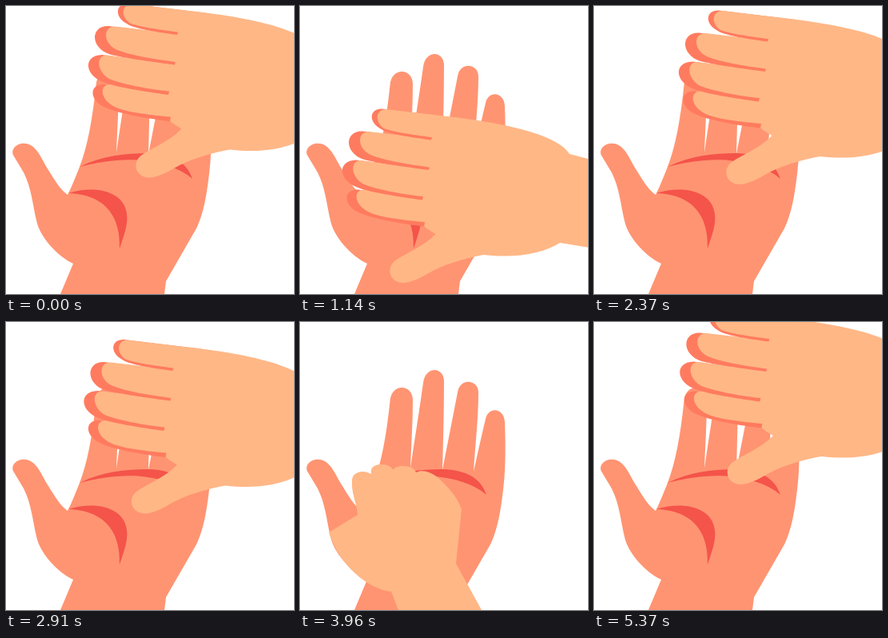
These frames come from a looping animation (360x360 px, 5.4 s). An HTML page with a canvas:

```html
<!DOCTYPE html>
<html>
<head>
<meta charset="utf-8">
<title>Hand washing</title>
<style>
html, body { margin: 0; width: 100%; height: 100%; overflow: hidden; background: #fff; }
canvas { display: block; width: 100vmin; height: 100vmin; }
</style>
</head>
<body>
<canvas id="stage"></canvas>
<script>
const SIZE = 360, CYCLE = 2700, STEP = 30;
const FIST_ON = 1200, FIST_OFF = 1530;
const PALM = '#ff9472', SKIN = '#ffb786', SHADE = '#ff7b5f', CREASE = '#f4544a';

const canvas = document.getElementById('stage');
const ctx = canvas.getContext('2d');
const ratio = window.devicePixelRatio || 1;
canvas.width = canvas.height = SIZE * ratio;

const shape = (color, d) => ({ color, path: new Path2D(d) });

const openPalm = [
  shape(PALM, `M68 360 L84 322 C63 312 42 288 38 268 C33 247 32 228 22 208 L10 188
    C3 177 19 167 31 174 C41 180 44 191 53 205 C60 216 67 229 77 236
    C83 224 88 211 92 201 C102 175 108 142 112.5 99 C114 76 141 77 141 98
    C141 126 139 154 138 183 C143 148 149 112 154 76 C157 54 180 56 180 74
    C180 110 179 148 178 185 L197 88 C200 69 223 72 223 88
    C223 121 219 154 217 187 C222 164 227 142 232 121 C236 104 256 108 256 126
    C257 150 257 175 255.5 194 C253 222 249 256 238 278 L200 344 L198 360 Z`),
  shape(CREASE, `M78 234 C114 223 148 233 151 260 C153 273 147 288 142 303
    C143 272 132 236 78 234 Z`),
  shape(CREASE, `M92 201 C120 187 150 184 178 184 C208 185 226 195 233 216
    C217 202 192 195 165 192.5 C140 191 115 195 92 201 Z`)
];

const openHand = [
  shape(SKIN, `M150 86 L220 94 C290 103 343 117 357 139 L430 158 L430 264 L345 250
    C325 263 290 270 250 265 C232 268 206 275 187 284.5 C172 293 160 300 148 300
    C133 299 127 283 138 273 C153 262 173 256 189.5 239 C184 236 178 232 175 229
    L173 195 L181 158 L184 120 Z`),
  shape(SHADE, 'M175 229.5 C150 227 112 220 97 213.5 C72 204 74 182 93 183.5 L173 195 L176 224 Z'),
  shape(SKIN, 'M175 224 C140 221 115 217 103 210 C87 200 87 184 100 183.5 L173 194 L200 205 L200 224 Z'),
  shape(SHADE, 'M173 196.5 C140 192 110 187 95 182 C67 173 66 147 90 146.5 L181 158 L174 192 Z'),
  shape(SKIN, 'M173 192 C145 189 115 183 100 177 C83 168 82 147 96 147 L181 158 L200 165 L200 192 Z'),
  shape(SHADE, 'M181 159 C150 155 115 150 100 146 C75 138 75 110 98 110.5 L184 121 L182 155 Z'),
  shape(SKIN, 'M181 155.5 C150 151 125 147 108 140 C91 132 91 111 106 111 L184 120 L205 130 L205 156 Z'),
  shape(SHADE, 'M184 121.5 C150 117 128 113 120 107 C105 98 107 82 123 82.5 L200 92 L185 118 Z'),
  shape(SKIN, 'M184 118 C160 115 135 111 125 107 C113 99 114 83 128 83 L220 94 L210 118 Z')
];

const fist = [
  shape(SKIN, `M36 263 L72 241 C72 230 64 214 65 200 C64 187 79 184 89 190
    C87 180 96 178 102 178 C110 178 114 181 117 185 C119 178 142 178 145 188
    C155 183 167 190 173 195 C186 207 196 218 202 234 L195 302 L227 360 L262 424
    L152 424 L123 360 L114 337 C85 334 49 304 36 263 Z`)
];

// time, x shift, y shift of the rubbing hand
const route = [
  [0, 30, -85.5], [150, 27, -68], [570, 9, -16], [690, 0, 0], [1140, -20, 46],
  [1410, -32, 73], [1680, -2, 22], [1860, 11, -12.5], [2100, 28, -57],
  [2370, 33, -77], [2700, 34.5, -99]
];

function locate(t) {
  const i = route.findIndex(p => p[0] > t);
  const a = route[i - 1], b = route[i];
  const k = (t - a[0]) / (b[0] - a[0]);
  return [a[1] + (b[1] - a[1]) * k, a[2] + (b[2] - a[2]) * k];
}

const FIST_HOME = locate(1260);

function draw(shapes, x = 0, y = 0) {
  ctx.save();
  ctx.translate(x, y);
  for (const s of shapes) {
    ctx.fillStyle = s.color;
    ctx.fill(s.path);
  }
  ctx.restore();
}

function render(now) {
  const t = Math.floor((now % CYCLE) / STEP) * STEP;
  const [x, y] = locate(t);
  ctx.setTransform(ratio, 0, 0, ratio, 0, 0);
  ctx.fillStyle = '#fff';
  ctx.fillRect(0, 0, SIZE, SIZE);
  draw(openPalm);
  if (t >= FIST_ON && t < FIST_OFF) draw(fist, x - FIST_HOME[0], y - FIST_HOME[1]);
  else draw(openHand, x, y);
}

let start;
function tick(now) {
  if (start === undefined) start = now;
  render(now - start);
  requestAnimationFrame(tick);
}
render(0);
requestAnimationFrame(tick);
</script>
</body>
</html>
```
